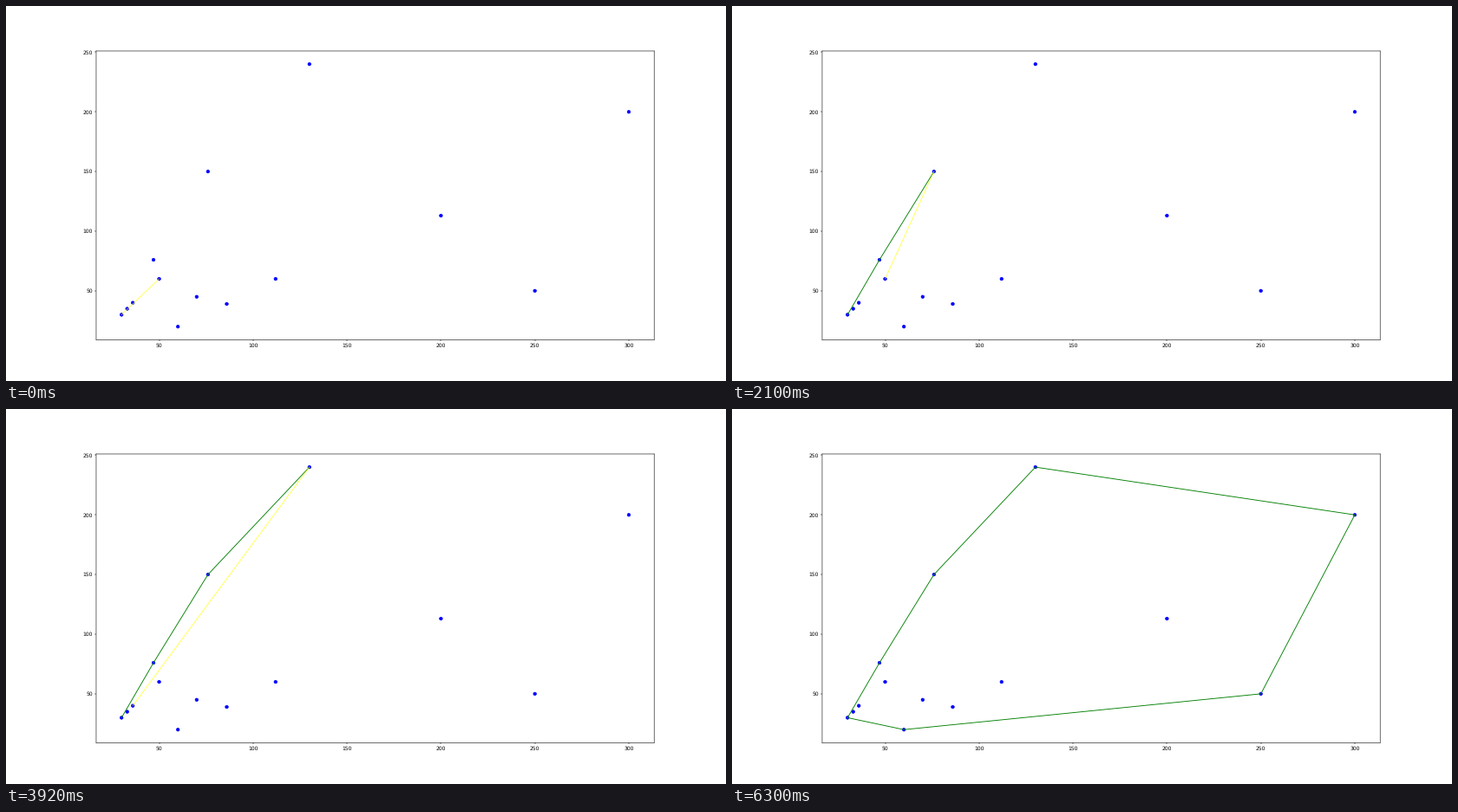
Write a matplotlib script that moves like this. It is 830 by 433 pixels and loops after 6370 ms.

```python
import matplotlib.pyplot as plt
from matplotlib.animation import FuncAnimation

DPI = 830 / 19.2
INTERVAL = 70

POINTS = [(30, 30), (50, 60), (60, 20), (70, 45), (86, 39), (112, 60),
          (200, 113), (250, 50), (300, 200), (130, 240), (76, 150),
          (47, 76), (36, 40), (33, 35)]


def cross(o, a, b):
    return (a[0] - o[0]) * (b[1] - o[1]) - (a[1] - o[1]) * (b[0] - o[0])


def wrap(points):
    """Gift wrapping: list of (hull so far, point being tested or None)."""
    start = min(points)
    hull, steps = [start], []
    while len(hull) == 1 or hull[-1] != start:
        here = hull[-1]
        best = None
        for p in points:
            if here == start and p == start:
                continue
            steps.append((list(hull), p))
            if p != here and (best is None or cross(here, best, p) > 0):
                best = p
            # the hull closes as soon as no point lies outside the edge to start
            if p == start and all(cross(here, p, q) <= 0 for q in points):
                break
        hull.append(best)
        steps.append((list(hull), None))
    return steps


STEPS = wrap(POINTS)

# soft subpixel drawing, as in a large plot scaled down
plt.rcParams.update({"path.snap": False, "text.hinting": "none",
                     "axes.linewidth": 0.95})

# the tiny surplus guards against rounding down to one pixel less
fig, ax = plt.subplots(figsize=(830.001 / DPI, 433.001 / DPI), dpi=DPI)
fig.subplots_adjust(left=0.12525, right=0.90025)

# one colour per point keeps the dots off the whole-pixel marker grid
ax.scatter(*zip(*POINTS), color=["blue"] * len(POINTS))
edges, = ax.plot([], [], color="green", lw=1.5)
probe, = ax.plot([], [], color="yellow", lw=1.6, alpha=0.65)


def draw(i):
    hull, tested = STEPS[i]
    edges.set_data(*zip(*hull))
    ends = [] if tested is None else [hull[-1], tested]
    probe.set_data([x for x, _ in ends], [y for _, y in ends])
    return edges, probe


anim = FuncAnimation(fig, draw, frames=len(STEPS), interval=INTERVAL,
                     repeat=True, repeat_delay=0)
plt.show()
```
